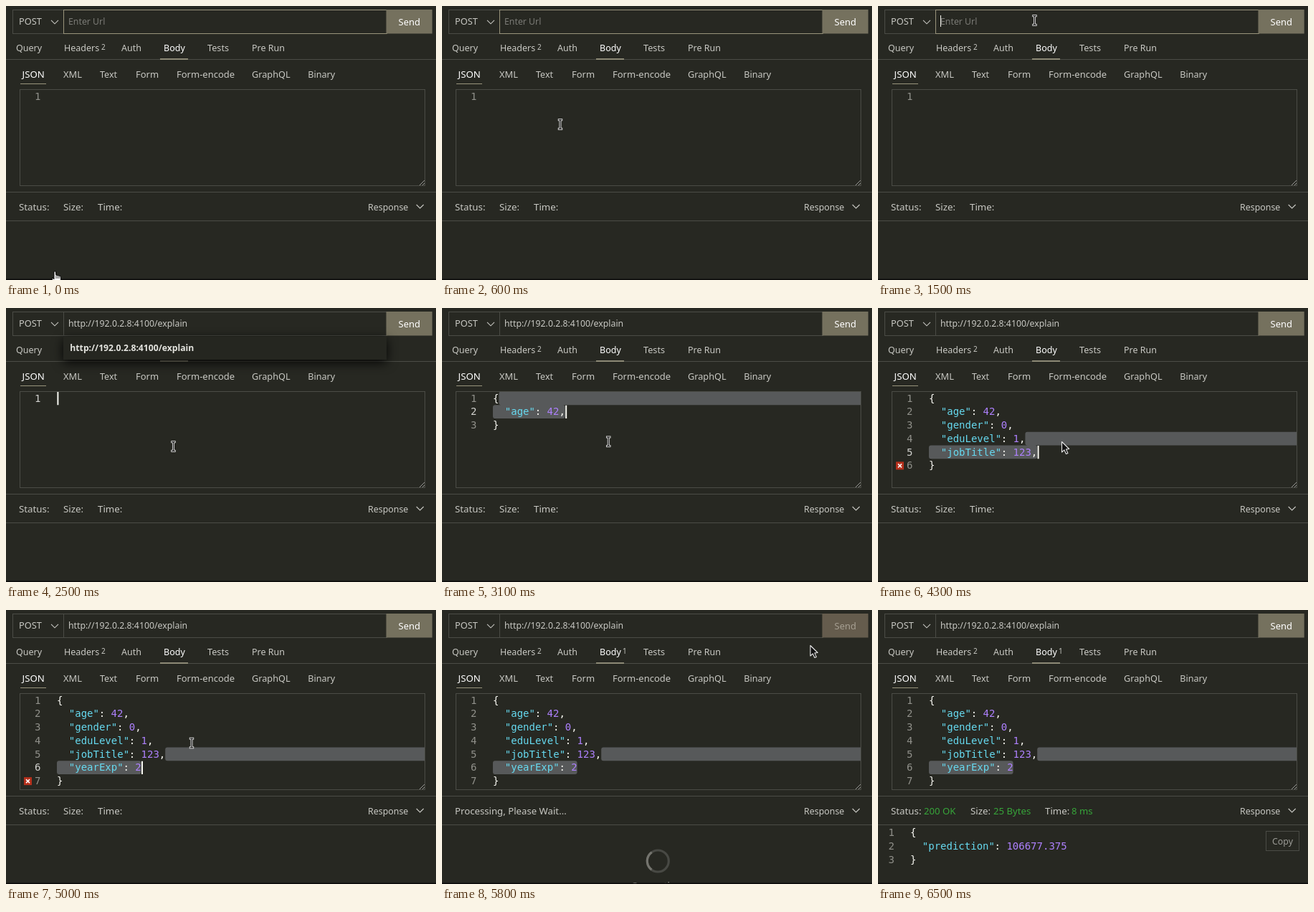
An HTML page with a canvas for the animation above (6600 ms loop, 600x382 px).

```html
<!DOCTYPE html>
<html lang="en">
<head>
<meta charset="utf-8">
<title>REST client demo</title>
<style>
html, body { margin: 0; width: 100%; height: 100%; overflow: hidden; background: #272822; }
canvas { display: block; }
</style>
</head>
<body>
<canvas id="stage" width="600" height="382"></canvas>
<script>
const ctx = document.getElementById('stage').getContext('2d');
const LOOP = 6600;
const SANS = '"Noto Sans", "Open Sans", sans-serif';
const MONO = '"DejaVu Sans Mono", "Noto Sans Mono", monospace';
const BG = '#272822', LINE = '#4b4c46', TEXT = '#c8c8c3', WHITE = '#f8f8f2';
const DIM = '#90908a', BUTTON = '#75715e', SELECT = '#57595a', GREEN = '#37a53a';
const URL_TEXT = 'http://192.0.2.8:4100/explain';
const FIELDS = ['"age": 42,', '"gender": 0,', '"eduLevel": 1,', '"jobTitle": 123,', '"yearExp": 2'];
const ADDED = [3000, 3400, 4000, 4300, 4900];
const COL = 8.4, ROW = 18.75, CODE_X = 71, CODE_Y = 116.6, BASE = 14;

// time, x, y, shape from that time on
const MOUSE = [
  [0, 68, 370, 'hand'], [100, 70, 366, 'hand'], [300, 94, 322, 'arrow'],
  [600, 165, 165, 'beam'], [1100, 215, 28, 'beam'], [1400, 218.5, 20, 'beam'],
  [1800, 218.5, 20, 'beam'], [2100, 226, 92, 'arrow'], [2300, 232, 150, 'beam'],
  [2500, 233.5, 193, 'beam'], [2800, 233, 187, 'beam'], [3600, 231, 185, 'beam'],
  [4100, 238, 186, 'beam'], [4300, 255.5, 185.5, 'arrow'], [4900, 256, 186, 'beam'],
  [5100, 262, 185, 'beam'], [5300, 360, 120, 'arrow'], [5500, 535, 28, 'hand'],
  [5600, 545, 22, 'hand'], [5800, 513, 48.5, 'arrow'], [6100, 440, 290, 'arrow'],
  [6300, 400, 400, 'arrow']
];

function text(s, x, y, size = 13, color = TEXT, weight = 400) {
  ctx.font = `${weight} ${size}px ${SANS}`;
  ctx.fillStyle = color;
  ctx.fillText(s, x, y);
}

function rect(x, y, w, h, color) {
  ctx.fillStyle = color;
  ctx.fillRect(x, y, w, h);
}

function frame(x, y, w, h, color) {
  ctx.strokeStyle = color;
  ctx.lineWidth = 1;
  ctx.strokeRect(x + 0.5, y + 0.5, w - 1, h - 1);
}

function poly(points, color, width) {
  ctx.beginPath();
  points.forEach(([x, y]) => ctx.lineTo(x, y));
  ctx.strokeStyle = color;
  ctx.lineWidth = width;
  ctx.stroke();
}

function chevron(x, y) {
  poly([[x - 5, y - 2.5], [x, y + 2.5], [x + 5, y - 2.5]], TEXT, 1.1);
}

function code(s, x, y) {
  ctx.font = `14px ${MONO}`;
  let col = 0;
  for (const part of s.match(/"[^"]*"|[\d.]+|[^"\d]+/g)) {
    ctx.fillStyle = part[0] === '"' ? '#66d9ef' : /^\d/.test(part) ? '#ae81ff' : WHITE;
    ctx.fillText(part, x + col * COL, y);
    col += part.length;
  }
}

function lineNumber(n, right, y, color) {
  ctx.font = `14px ${MONO}`;
  ctx.fillStyle = color;
  ctx.textAlign = 'right';
  ctx.fillText(n, right, y);
  ctx.textAlign = 'left';
}

function urlBar(t) {
  frame(9, 5, 72, 34, LINE);
  text('POST', 18, 26, 12.8);
  chevron(68, 22.3);
  const focused = t < 2300;
  frame(80, 5, 452, 34, focused ? '#99947c' : LINE);
  if (t < 1800) text('Enter Url', 87, 25.5, 12.3, '#7b7b76');
  else text(URL_TEXT, 87, 25.5, 12.3);
  if (t >= 1100 && t < 1700) rect(87, 13, 1, 16, WHITE);
  if (t >= 1800 && focused) {
    ctx.font = `400 12.3px ${SANS}`;
    rect(88 + ctx.measureText(URL_TEXT).width, 13, 1, 16, WHITE);
  }
  const busy = t >= 5800 && t < 6100;
  rect(530.5, 5, 64.2, 33.5, busy ? '#655c4d' : BUTTON);
  text('Send', 547.5, 26.5, 13, busy ? '#a69f92' : '#fff');
}

function tabs(t) {
  rect(0, 74, 600, 1, LINE);
  [['Query', 14, 12.5], ['Headers', 81, 12.5], ['Auth', 161, 12.5], ['Tests', 281, 12.7], ['Pre Run', 343, 12.5]]
    .forEach(([s, x, size]) => text(s, x, 63, size));
  text('Body', 220, 63, 12.5, '#fff', 500);
  text('2', 133, 60.5, 10);
  if (t >= 5100) text('1', 252, 60.5, 10);
  rect(215, 73, 39, 2, '#8d8a76');

  [['XML', 80, 12.9], ['Text', 131, 12.5], ['Form', 181, 13], ['Form-encode', 238, 13], ['GraphQL', 343, 12.7], ['Binary', 421.3, 12.6]]
    .forEach(([s, x, size]) => text(s, x, 100, size));
  text('JSON', 22.6, 100, 13.2, '#fff', 500);
  rect(20, 108, 36, 1, '#99947c');
}

function editor(t) {
  const n = ADDED.filter(at => t >= at).length;
  const rows = n ? ['{', ...FIELDS.slice(0, n).map(f => '  ' + f), '}'] : [''];
  const top = i => CODE_Y + i * ROW;
  const end = i => CODE_X + rows[i].length * COL;
  const active = t >= 2400 && t < 5600;

  if (n) {
    ctx.fillStyle = SELECT;
    ctx.beginPath();
    ctx.roundRect(end(n - 1), top(n - 1), 584 - end(n - 1), ROW, [3, 0, 0, 3]);
    ctx.roundRect(CODE_X, top(n), end(n) - CODE_X, ROW, [3, 3, 3, 3]);
    ctx.fill();
  }
  rows.forEach((row, i) => {
    lineNumber(i + 1, 48.5, top(i) + BASE, active && i === n ? '#d2d2cf' : DIM);
    if (row) code(row, CODE_X, top(i) + BASE);
  });
  if (active) rect(end(n) + 0.4, top(n) + 0.4, 2, ROW - 0.5, WHITE);

  if (t >= 3300 && t < 5100) {
    const y = top(n + 1) + 4;
    rect(25, y, 11, 11, '#b5301c');
    poly([[28, y + 3], [33, y + 8]], '#fff', 1.5);
    poly([[33, y + 3], [28, y + 8]], '#fff', 1.5);
  }
  frame(19, 116, 566, 135, LINE);
  poly([[577, 250], [584, 243]], '#aaa', 0.9);
  poly([[581, 250], [584, 247]], '#aaa', 0.9);
}

function spinner(t) {
  ctx.lineWidth = 3.2;
  ctx.strokeStyle = '#484944';
  ctx.beginPath();
  ctx.arc(301.3, 350, 15, 0, Math.PI * 2);
  ctx.stroke();
  const a = 2.2 + (t - 5800) / 1000 * Math.PI * 2;
  ctx.strokeStyle = '#74746e';
  ctx.beginPath();
  ctx.arc(301.3, 350, 15, a, a + 1.9);
  ctx.stroke();
  text('Connecting', 264, 389, 13);
}

function response(t) {
  rect(0, 259, 600, 1, LINE);
  rect(0, 299, 600, 1, LINE);
  text('Response', 505, 284.5, 12.4);
  chevron(577.7, 279.5);
  if (t < 5800) {
    text('Status:', 18, 285, 13.3);
    text('Size:', 80, 285, 13.3);
    text('Time:', 128, 285, 13.3);
  } else if (t < 6100) {
    text('Processing, Please Wait...', 18, 285, 13.2);
    spinner(t);
  } else {
    [['Status:', 18, '200 OK', 64], ['Size:', 129, '25 Bytes', 161], ['Time:', 233, '8 ms', 270]]
      .forEach(([label, x, value, vx]) => {
        text(label, x, 285, 13.3);
        text(value, vx, 285, 13.2, GREEN);
      });
    ['{', '  "prediction": 106677.375', '}'].forEach((row, i) => {
      const y = 315.3 + i * 18.7;
      lineNumber(i + 1, 23, y, DIM);
      code(row, 45, y);
    });
    frame(541, 308, 47, 28, LINE);
    text('Copy', 550, 326.5, 12.4, '#9b9b96');
  }
}

function popup(t) {
  if (t < 1800 || t >= 2600) return;
  ctx.save();
  ctx.shadowColor = 'rgba(0,0,0,.9)';
  ctx.shadowBlur = 15;
  ctx.shadowOffsetY = 4;
  rect(80, 40, 451, 32, '#252620');
  ctx.restore();
  text(URL_TEXT, 89.3, 60, 12.2, '#e4e4df', 700);
}

function shape(points, fill, stroke) {
  ctx.beginPath();
  points.forEach(([x, y]) => ctx.lineTo(x, y));
  ctx.closePath();
  ctx.lineJoin = 'round';
  ctx.lineWidth = 1.1;
  ctx.strokeStyle = stroke;
  ctx.fillStyle = fill;
  ctx.fill();
  ctx.stroke();
  ctx.lineJoin = 'miter';
}

const CURSORS = {
  arrow() {
    shape([[1, 1], [1, 15.5], [4.4, 12.4], [7, 18], [9.4, 16.9], [7, 11.4], [11.2, 11]], '#111', '#e8e8e8');
  },
  beam() {
    for (const [color, width, d] of [['#e8e8e8', 3, 0.8], ['#111', 1.2, 0]]) {
      poly([[0, -6], [0, 6]], color, width);
      poly([[-2.4 - d, -6.3], [2.4 + d, -6.3]], color, width);
      poly([[-2.4 - d, 6.3], [2.4 + d, 6.3]], color, width);
    }
  },
  hand() {
    shape([[-1, 0], [1.4, 0], [1.8, 5], [8, 6.5], [8.6, 11], [7, 17], [0, 17], [-4, 11], [-3.5, 9], [-1, 10.5]], '#fff', '#111');
    [1.9, 4, 6.1].forEach(x => poly([[x, 6], [x, 10]], '#222', 0.8));
  }
};

function mouse(t) {
  let i = MOUSE.length - 1;
  while (MOUSE[i][0] > t) i--;
  const a = MOUSE[i], b = MOUSE[i + 1] || a;
  const p = b === a ? 0 : (t - a[0]) / (b[0] - a[0]);
  ctx.save();
  ctx.translate(a[1] + (b[1] - a[1]) * p, a[2] + (b[2] - a[2]) * p);
  CURSORS[a[3]]();
  ctx.restore();
}

// Steps of 100 ms, every fifth one held twice as long
function snap(t) {
  const k = Math.floor(t / 100);
  return (k % 5 === 2 ? k - 1 : k) * 100;
}

function draw(t) {
  rect(0, 0, 600, 382, BG);
  urlBar(t);
  tabs(t);
  editor(t);
  response(t);
  popup(t);
  rect(0, 380.5, 600, 1.5, '#0b0b0a');
  mouse(t);
}

const start = performance.now();
function tick() {
  draw(snap((performance.now() - start) % LOOP));
  requestAnimationFrame(tick);
}
tick();
</script>
</body>
</html>
```
